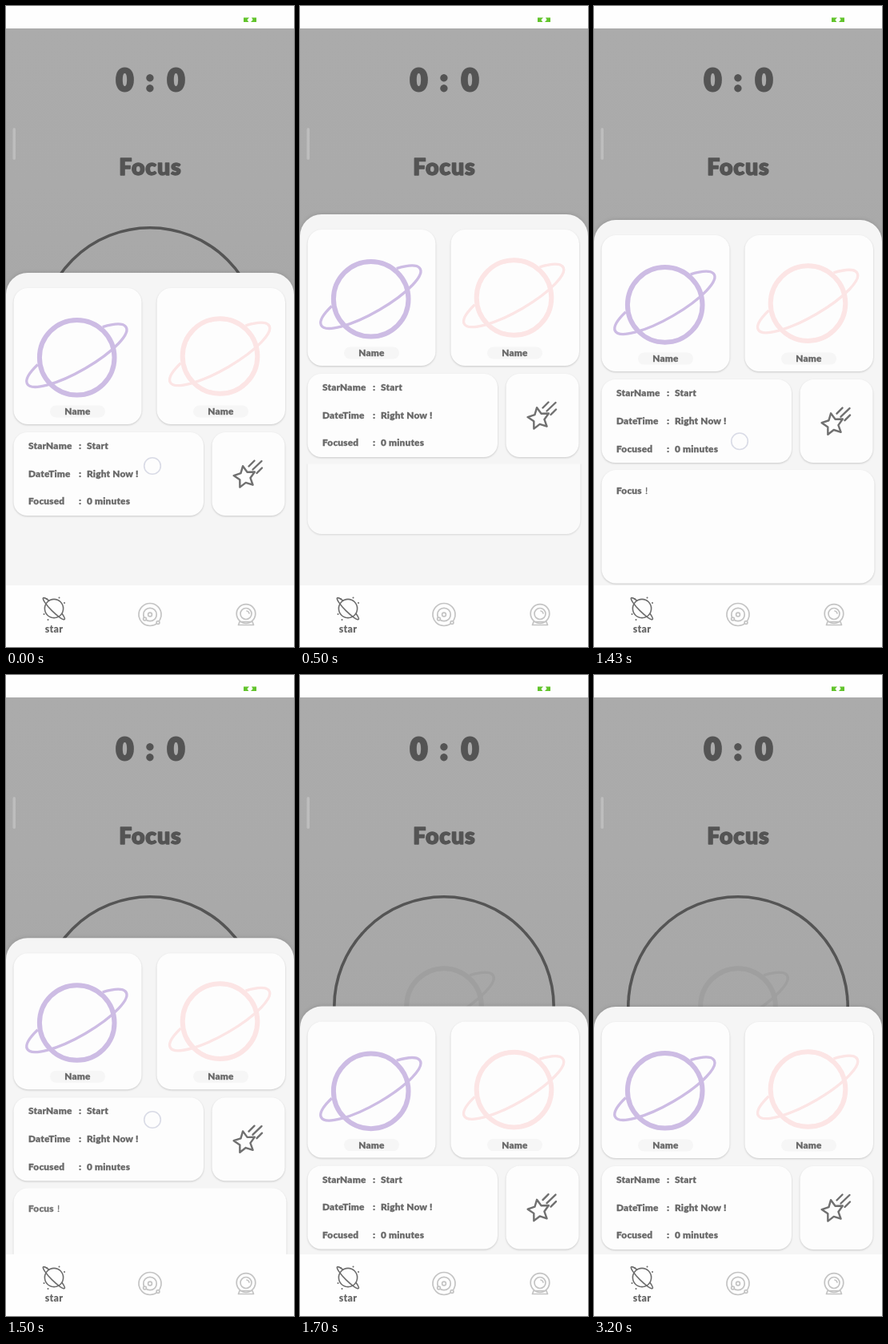
An HTML page that plays this animation: 360 px wide and 800 px high, repeating every 3.23 s.

```html
<!DOCTYPE html>
<html lang="en">
<head>
<meta charset="utf-8">
<title>Focus timer sheet</title>
<style>
  html, body { margin: 0; width: 100%; height: 100%; overflow: hidden; background: #fefefe; }
  svg { display: block; width: 100vw; height: 100vh; }
  text { font-family: Lato, "Open Sans", sans-serif; font-weight: 900; }
  .line { fill: none; stroke-linecap: round; stroke-linejoin: round; }
  .mid { text-anchor: middle; }
  .head { fill: #545454; stroke: #545454; stroke-linejoin: round; }
  .card { fill: #fdfdfd; filter: drop-shadow(0 1px .8px rgba(0, 0, 0, .18)); }
  .pill { fill: #f6f6f6; }
  .label { fill: #686868; stroke: #686868; stroke-width: .3; font-size: 11.8px; letter-spacing: .2px; }
  #panel { fill: #f5f5f5; filter: drop-shadow(0 -1px 2px rgba(0, 0, 0, .1)); }
</style>
</head>
<body>
<svg viewBox="0 0 360 800" preserveAspectRatio="none">
  <defs>
    <linearGradient id="dim" gradientUnits="userSpaceOnUse" x1="0" y1="28" x2="0" y2="420">
      <stop offset="0" stop-color="#ababab"/>
      <stop offset=".5" stop-color="#aaaaaa"/>
      <stop offset="1" stop-color="#a7a7a7"/>
    </linearGradient>
    <clipPath id="reveal"><rect y="311.5" width="360" height="160"/></clipPath>
    <g id="planet" class="line">
      <circle r="46.8" stroke-width="6"/>
      <path transform="translate(-.5 -2.5) rotate(-29.8)" stroke-width="3.4" stroke-linecap="butt"
        d="M45.9-14.8A71.2 19.3 0 1 1-47.7-14.3"/>
    </g>
  </defs>

  <rect width="360" height="800" fill="#fefefe"/>
  <rect y="28" width="360" height="700" fill="url(#dim)"/>
  <path fill="#62c42c" d="M297 14.5h7l-2.6 2.7 2 2.8h-6.4zM307 14.5h6v5.5h-7l2.6-2.7z"/>
  <rect x="8.5" y="152" width="3.5" height="40" rx="1.75" fill="#bdbdbd"/>

  <g class="head mid" font-size="37" stroke-width="2.8">
    <text x="148.5" y="105.7">0</text>
    <text x="180" y="105.7">:</text>
    <text x="212.5" y="105.7">0</text>
  </g>
  <text class="head mid" x="180.4" y="210.5" font-size="28.5" letter-spacing=".8" stroke-width="1.3">Focus</text>
  <circle class="line" cx="180" cy="414" r="137.2" stroke="#555" stroke-width="3.6"/>
  <use href="#planet" x="180" y="413" stroke="#9f9f9f"/>

  <g id="sheet">
    <path id="panel" d="M0 600V27A27 27 0 0 1 27 0H333A27 27 0 0 1 360 27V600Z"/>

    <rect class="card" x="9.5" y="19" width="160" height="170" rx="18"/>
    <rect class="card" x="188.5" y="19" width="160.5" height="170" rx="18"/>
    <g id="planets">
      <use href="#planet" x="88.7" y="105.8" stroke="#cdbce4"/>
      <use href="#planet" x="267.5" y="104" stroke="#fce5e5"/>
    </g>
    <rect class="pill" x="55" y="165.5" width="69" height="15" rx="7.5"/>
    <rect class="pill" x="234" y="165.5" width="69" height="15" rx="7.5"/>
    <text class="label mid" x="89.5" y="177">Name</text>
    <text class="label mid" x="268.5" y="177">Name</text>

    <rect class="card" x="9.5" y="199" width="237.5" height="104" rx="17"/>
    <g id="info" class="label"></g>

    <rect class="card" x="257.5" y="199" width="91" height="104" rx="17"/>
    <g class="line" stroke="#707070" stroke-width="2.4">
      <path id="star"/>
      <path d="M303.5 241.5l7-7M308.5 245.5l11-10.5M313.5 250l6.5-6.5"/>
    </g>

    <g clip-path="url(#reveal)">
      <g id="note">
        <rect class="card" x="9.5" y="312" width="341" height="141.5" rx="18"/>
        <text class="label" x="28" y="342">Focus</text>
        <text class="label" x="64" y="342" style="font-weight:400">!</text>
      </g>
    </g>
  </g>

  <rect y="723" width="360" height="77" fill="#fefefe"/>
  <g class="line" stroke="#6c6c6c" stroke-width="1.6">
    <circle cx="60" cy="752" r="11.6"/>
    <path transform="translate(60 752) rotate(45)" d="M-11.8-2.5A18.8 3.5 0 1 0 11.8-2.5"/>
    <path stroke-width="2" d="M51 740h.01M66.5 738.5h.01M73 745h.01M47.5 759h.01M52.5 766h.01"/>
  </g>
  <text class="mid" x="60" y="782" font-size="12.4" letter-spacing=".3" fill="#666">star</text>
  <g class="line" stroke="#c4c4c4" stroke-width="1.7">
    <circle cx="180" cy="759.5" r="14"/>
    <circle cx="180" cy="759.5" r="8.2"/>
    <circle cx="180" cy="759.5" r="2.4"/>
    <circle cx="173.5" cy="765" r="1.9" fill="#fefefe"/>
    <circle cx="190" cy="769.5" r="1.9" fill="#fefefe"/>
    <circle cx="300" cy="758.5" r="11.8"/>
    <circle cx="300" cy="758.5" r="7"/>
    <path d="M301 755q2.5 .5 3 3M292 768.5h16l1.5 4h-19z"/>
  </g>

  <circle id="touch" class="line" r="10.3" stroke="#d9dbe6" stroke-width="1.6"/>
</svg>
<script>
const LOOP = 3230, NOTE_H = 141.5;
const $ = id => document.getElementById(id);
const clamp = v => Math.max(0, Math.min(1, v));
const ramp = (t, a, b) => clamp((t - a) / (b - a));
const easeOut = (p, power = 3) => 1 - (1 - p) ** power;
const smooth = p => p * p * (3 - 2 * p);

// Linear interpolation through [time, value] pairs.
function track(t, keys) {
  if (t <= keys[0][0]) return keys[0][1];
  for (let i = 1; i < keys.length; i++) {
    const [a, u] = keys[i - 1], [b, v] = keys[i];
    if (t <= b) return u + (v - u) * (t - a) / (b - a);
  }
  return keys[keys.length - 1][1];
}

const DROP = [[1330, 260], [1365, 260.5], [1400, 262.5], [1430, 266.5], [1465, 288],
  [1500, 327], [1535, 368], [1570, 396], [1605, 406], [1640, 411], [1680, 413.3], [1730, 414]];

function sheetTop(t) {
  return t < 1330 ? 333 - 73 * easeOut(ramp(t, 20, 230)) : track(t, DROP);
}

function buildInfo() {
  const rows = [["StarName", "Start"], ["DateTime", "Right Now !"], ["Focused", "0 minutes"]];
  $("info").innerHTML = rows.map(([key, value], i) => {
    const y = 220 + i * 34.7;
    return `<text x="28" y="${y}">${key}</text><text x="91" y="${y}">:</text><text x="101" y="${y}">${value}</text>`;
  }).join("");
}

function buildStar() {
  const points = Array.from({ length: 10 }, (_, i) => {
    const a = (-100 + i * 36) * Math.PI / 180, r = i % 2 ? 7 : 14;
    return [298.5 + r * Math.cos(a), 255 + r * Math.sin(a)].map(v => v.toFixed(2));
  });
  $("star").setAttribute("d", "M" + points.join("L") + "Z");
}

function draw(t) {
  $("sheet").setAttribute("transform", `translate(0 ${sheetTop(t).toFixed(2)})`);
  $("planets").setAttribute("transform", `translate(0 ${-smooth(ramp(t, 2300, 2800))})`);

  const grow = easeOut(ramp(t, 370, 830), 2.85);
  $("note").setAttribute("transform", `translate(0 ${(grow - 1) * NOTE_H})`);
  $("note").setAttribute("opacity", grow ** 0.7 * (1 - 0.6 * ramp(t, 1480, 1640)));

  const second = t > 1000;
  $("touch").setAttribute("cx", second ? 182 + 2 * ramp(t, 1430, 1570) : 183);
  $("touch").setAttribute("cy", second ? track(t, [[1330, 530], [1430, 543], [1480, 555]]) : 574);
  $("touch").setAttribute("opacity", second
    ? ramp(t, 1325, 1365) * (1 - ramp(t, 1500, 1640))
    : 1 - ramp(t, 30, 130));
}

const start = performance.now();
function tick() {
  draw((performance.now() - start) % LOOP);
  requestAnimationFrame(tick);
}

buildInfo();
buildStar();
draw(0);
requestAnimationFrame(tick);
</script>
</body>
</html>
```
